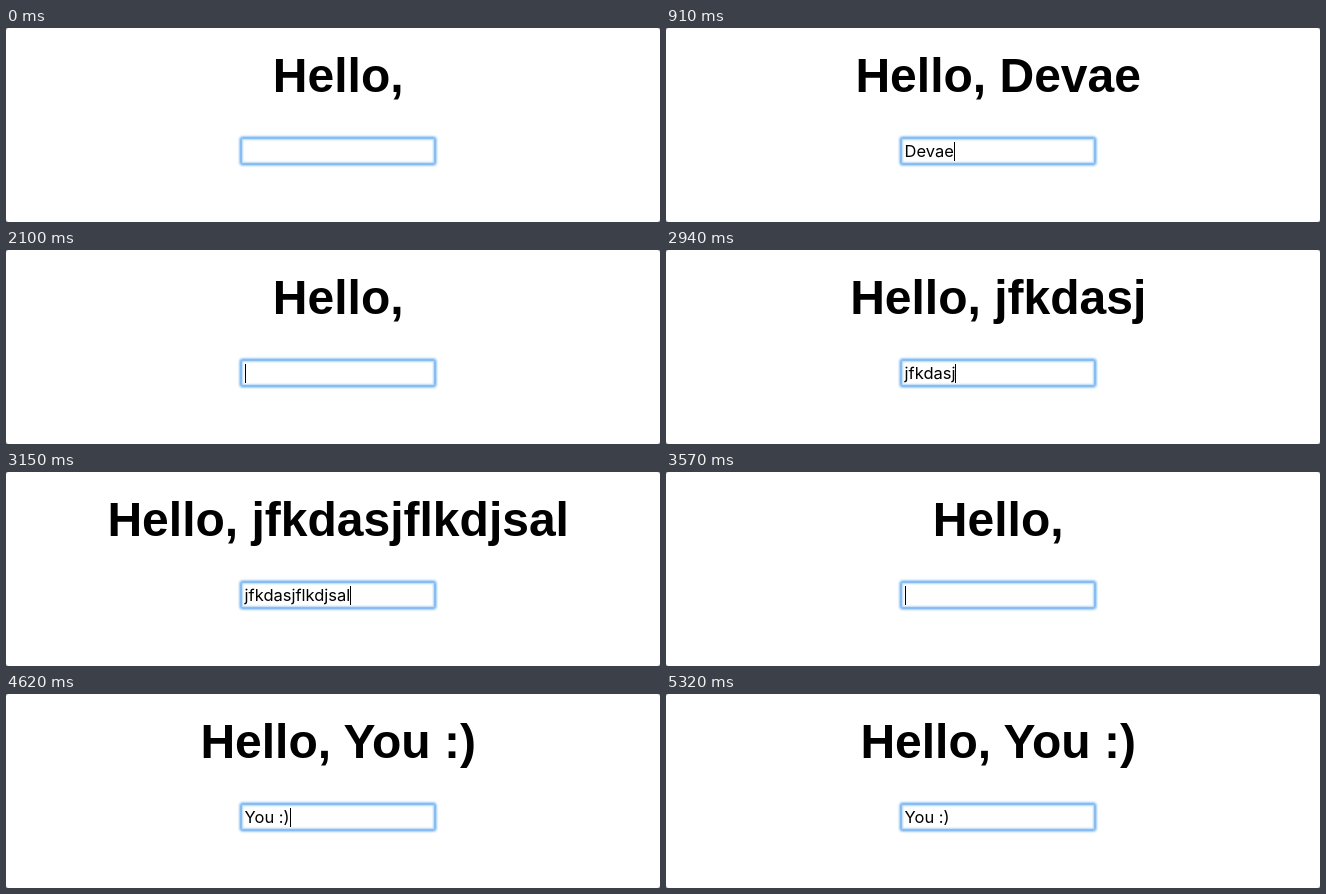
An HTML page that plays this animation: 654x194 px, repeating every 5.6 s.

```html
<!DOCTYPE html>
<html lang="en">
<head>
<meta charset="utf-8">
<style>
html, body { margin: 0; width: 100%; height: 100%; overflow: hidden; background: #8a8a8a; }
main { position: relative; width: 654px; height: 194px; background: #fff; border-radius: 3px; overflow: hidden; }
h1 {
  position: absolute; left: 0; top: 20px; width: 664.4px; margin: 0;
  font: bold 48px/56px "Liberation Sans", Arial, sans-serif;
  text-align: center; white-space: nowrap; color: #000;
}
#field {
  position: absolute; left: 234px; top: 109px; width: 192px; height: 24px;
  border: 2px solid #88bdf2; border-radius: 3px;
  box-shadow: 0 0 2px 1px #9ecbf7, inset 0 0 2px 1px #b4d7f9;
}
#line {
  position: absolute; left: 2.6px; top: 1px; display: flex; align-items: center;
  font: 16.5px/23px Inter, "Open Sans", sans-serif; white-space: pre; color: #000; height: 23px;
}
#caret { width: 1px; height: 19px; background: #000; }
</style>
</head>
<body>
<main>
  <h1 id="title"></h1>
  <div id="field"><div id="line"><span id="text"></span><i id="caret"></i></div></div>
</main>
<script>
const LOOP = 5600;
const $ = id => document.getElementById(id);
const name = "Devaem", mash = "jfkdasjflkdjsalfjkl", reply = "You :)";

// Each step: start time, word being typed, letters typed so far
const keys = [
  [0, "", 0],
  [420, name, 1], [490, name, 2], [770, name, 3], [840, name, 4], [910, name, 5], [1120, name, 6],
  [1400, name, 4], [1470, name, 2], [1540, name, 0],
  [2800, mash, 2], [2870, mash, 4], [2940, mash, 7], [3010, mash, 9], [3080, mash, 12],
  [3150, mash, 15], [3220, mash, 17], [3290, mash, 19], [3430, mash, 0],
  [4060, reply, 1], [4130, reply, 2], [4270, reply, 3],
  [4480, reply, 4], [4550, reply, 5], [4620, reply, 6]
];
const caretOn = [[420, 2170], [2590, 3710], [4060, 5250]];

function draw(now) {
  const t = now % LOOP;
  const [, word, count] = keys.findLast(k => k[0] <= t);
  const typed = word.slice(0, count);
  $("title").textContent = "Hello, " + typed;
  $("text").textContent = typed;
  const lit = caretOn.some(([from, to]) => t >= from && t < to);
  $("caret").style.visibility = lit ? "visible" : "hidden";
}

const start = performance.now();
function tick() {
  draw(performance.now() - start);
  requestAnimationFrame(tick);
}
tick();
</script>
</body>
</html>
```
